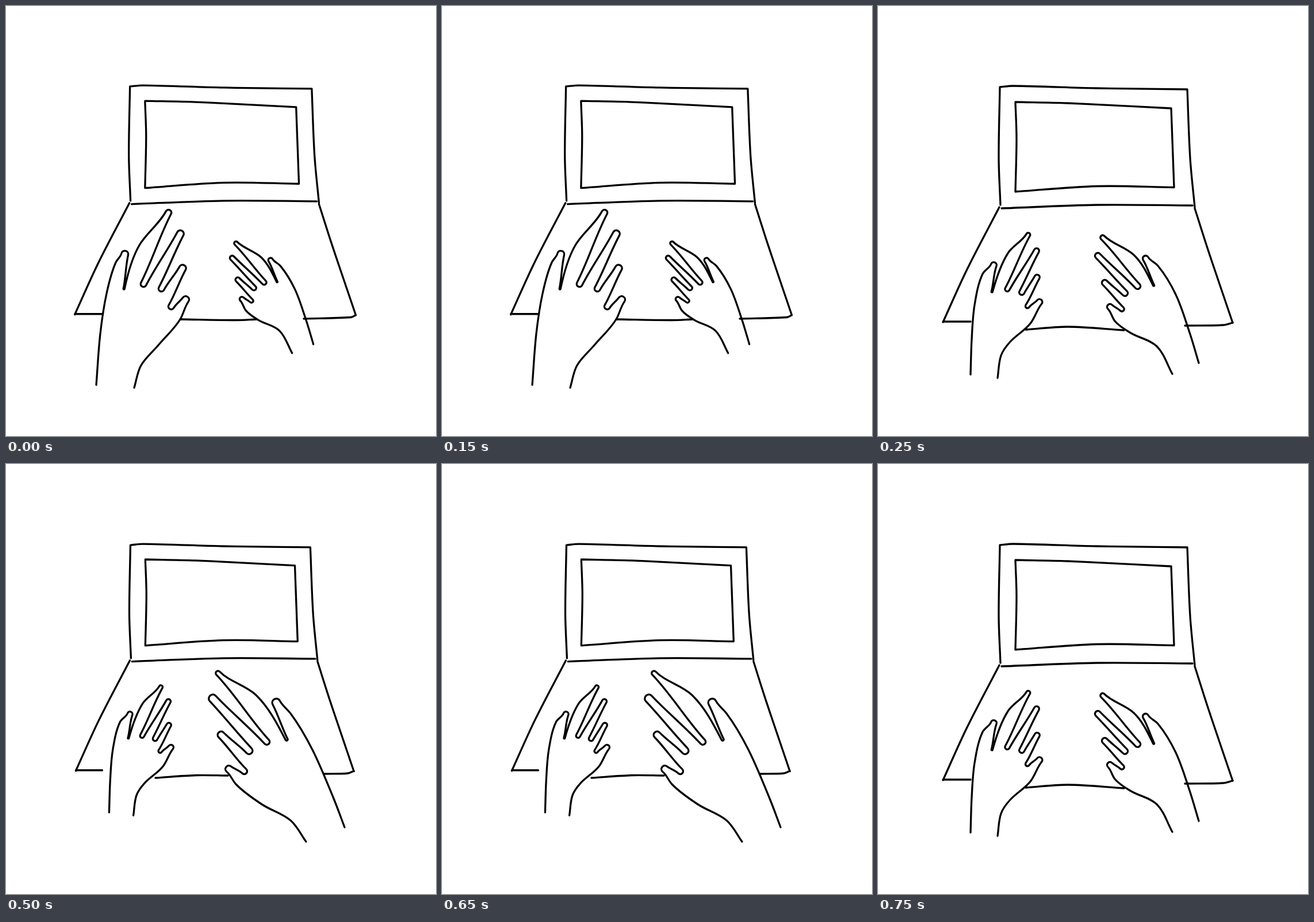
Animation of 748x748 px, one loop 1 s. Source, as an HTML page with a canvas:

```html
<!DOCTYPE html>
<html lang="en">
<head>
<meta charset="utf-8">
<title>Typing hands</title>
<style>
html, body { margin: 0; height: 100%; overflow: hidden; background: #fff; }
canvas { display: block; width: 748px; height: 748px; }
</style>
</head>
<body>
<canvas id="stage" width="748" height="748"></canvas>
<script>
const ctx = document.getElementById('stage').getContext('2d');
const STEP = 250;

// Strokes are split by "|". A key "x,y" is passed smoothly;
// "x,y,r" is a U-turn of radius r: a fingertip or the gap between fingers.
const parse = text => text.split('|').map(stroke =>
  outline(stroke.trim().split(/\s+/).map(key => key.split(',').map(Number))));

// Give each key an entry and exit point (p, q) with their directions (u, v).
function outline(keys) {
  return keys.map(([x, y, r], i) => {
    const a = keys[i - 1] || keys[i], b = keys[i + 1] || keys[i];
    const gx = b[0] - a[0], gy = b[1] - a[1];
    if (!r) {
      const g = Math.hypot(gx, gy), u = [gx / g, gy / g];
      return { p: [x, y], q: [x, y], u, v: u };
    }
    const ax = x - (a[0] + b[0]) / 2, ay = y - (a[1] + b[1]) / 2;
    const len = Math.hypot(ax, ay), dx = ax / len, dy = ay / len;
    const side = gx * dy - gy * dx < 0 ? r : -r;
    const cx = x - dx * r, cy = y - dy * r;
    return {
      p: [cx + dy * side, cy - dx * side], u: [dx, dy],
      q: [cx - dy * side, cy + dx * side], v: [-dx, -dy], r
    };
  });
}

function curve(from, u, to, v, reach) {
  ctx.bezierCurveTo(
    from[0] + u[0] * reach, from[1] + u[1] * reach,
    to[0] - v[0] * reach, to[1] - v[1] * reach, ...to);
}

// The fit moves and scales the shape but not the pen.
function draw(strokes, [scale, dx, dy] = [1, 0, 0]) {
  ctx.beginPath();
  ctx.setTransform(scale, 0, 0, scale, dx, dy);
  for (const keys of strokes) {
    ctx.moveTo(...keys[0].p);
    keys.forEach((key, i) => {
      const last = keys[i - 1];
      if (last) {
        const gap = Math.hypot(key.p[0] - last.q[0], key.p[1] - last.q[1]);
        curve(last.q, last.v, key.p, key.u, gap / 3);
      }
      if (key.r) curve(key.p, key.u, key.q, key.v, key.r * 4 / 3);
    });
  }
  ctx.resetTransform();
  ctx.stroke();
}

const laptop = parse(`
  212,141 210,265 213,346 | 212,141 235,139 380,143 538,145 |
  538,145 543,265 551,350 | 215,352 380,346 547,347 |
  239,168 241,230 239,323 | 239,167 330,169 510,178 |
  510,178 515,315 | 239,323 380,313.5 515,315.5 |
  211,350 155,458 113,550 | 551,352 575,427 617,551 | 113,549 161,549`);

const leftSmall = parse(`161,641 163,580 168,520 182,466
  203,446,5 198,498,1 226,430 263,395,3.5 223,496,4 278,422,4.5
  248,502,4.5 279,468,4.5 258,525,3.5 284,511,5
  266,551 230,584 214,608 208,647`);
const leftLarge = parse(`157,659 164,570 175,500 191,446
  208,426,6 205,493,1 232,416 285,355,5 237,488,5 306,391,6
  268,496,5 310,451,6 285,527,5 316,506,6
  303,545 265,590 235,625 223,664`);
const rightSmall = parse(`558,621 542,568 518,502 487,452
  463,435,5 480,487,1 445,433 388,400,4 455,491,5 379,431,5
  433,503,5 391,478,5 427,530,4 400,520,5
  412,548 440,569 485,592 512,640`);
const rightLarge = parse(`589,632 570,582 533,497 495,434
  467,409,7 489,481,2 435,402 366,361,4 457,487,5 355,403,7
  427,503,6 370,467,6 418,538,5 383,527,6
  400,557 445,592 495,620 522,657`);

const middle = {
  left: [leftSmall], right: [rightSmall], laptop: [laptop],
  edge: [parse('257,563 330,558 428,564 | 534,556 600,555 617,551')]
};
const leftDown = {
  left: [leftLarge], right: [rightSmall, [.805, 85.5, 88.5]],
  laptop: [laptop, [.97, 10, 3.2]],
  edge: [parse('303,545 400,546.5 436,545 | 518,544 600,541.5 608,538')]
};
const rightDown = {
  left: [leftSmall, [.897, 35, 31]], right: [rightLarge],
  laptop: [laptop, [.96, 12.9, 5.7]],
  edge: [parse('260,546 330,541.5 386,542 | 554,539 595,538 605,534')]
};
const poses = [leftDown, middle, rightDown, middle];

function render(time) {
  ctx.clearRect(0, 0, 748, 748);
  ctx.lineWidth = 3.3;
  ctx.lineCap = ctx.lineJoin = 'round';
  const pose = poses[Math.floor(time / STEP) % poses.length];
  for (const part of Object.values(pose)) draw(...part);
}

const start = performance.now();
function tick() {
  render(performance.now() - start);
  requestAnimationFrame(tick);
}
tick();
</script>
</body>
</html>
```
